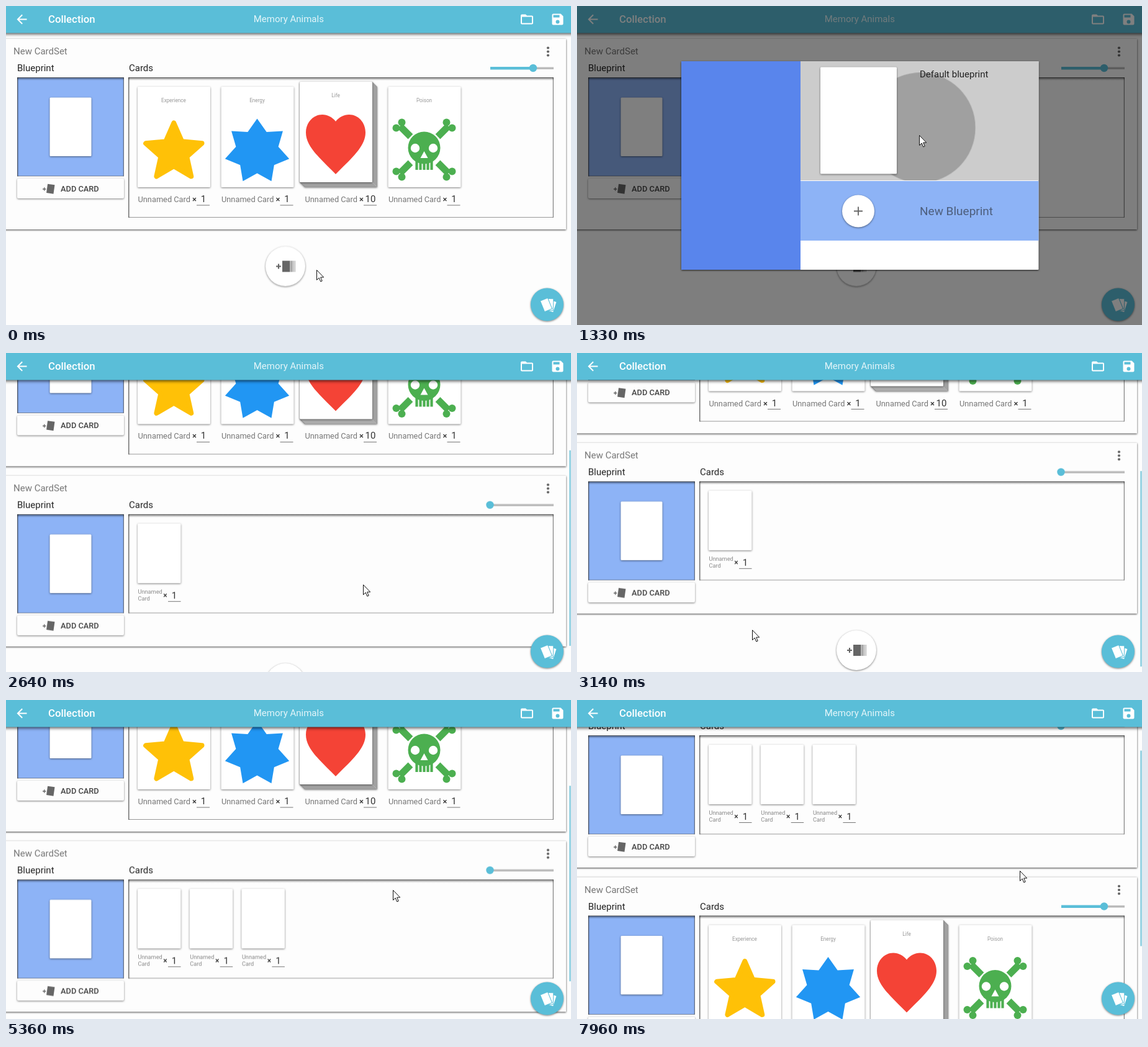
Write an HTML page that moves like this. It is 910 px wide and 514 px high and loops after 8 s.

```html
<!DOCTYPE html>
<html lang="en">
<head>
<meta charset="utf-8">
<title>Card collection</title>
<style>
@property --scroll { syntax: "<number>"; inherits: true; initial-value: 0; }
html, body { margin: 0; height: 100%; overflow: hidden; background: #fdfdfd; }
svg { display: block; width: 100vw; height: 100vh; font-family: Roboto, sans-serif; animation: scroll 8s ease-in-out infinite; }
.raised { filter: drop-shadow(0 1px 1.5px rgba(0,0,0,.5)); }
.sheet { filter: drop-shadow(0 1px 1.5px rgba(0,0,0,.75)); }
.bar { filter: drop-shadow(0 2px 2.5px rgba(0,0,0,.65)); }
.mid { text-anchor: middle; }
.bold { font-weight: 500; }

#content { transform: translateY(calc(var(--scroll) * -1px)); }
#thumb { transform: translateY(calc(var(--scroll) * .63px)); }
#setA, #setB, #plus, #thumbBox, #card1, #card2, #rowHover, #menuHover { animation: 8s step-end infinite; }
#setA { animation-name: setA; }
#setB { animation-name: setB; }
#plus { animation-name: plus; }
#thumbBox { animation-name: thumb; }
#card1 { animation-name: card1; }
#card2 { animation-name: card2; }
#rowHover { animation-name: rowHover; }
#menuHover { animation-name: menuHover; }
#shade { animation: shade 8s linear infinite; }
#dialog { transform-origin: 450px 420px; animation: dialog 8s ease-out infinite; }
#rowRipple { transform-origin: 553px 196px; animation: rowRipple 8s linear infinite; }
#menu { transform-origin: 888px 253px; animation: menu 8s ease-out infinite; }
#menuRipple { transform-origin: 856px 277px; animation: menuRipple 8s linear infinite; }
#cursor { animation: cursor 8s ease-in-out infinite; }

@keyframes scroll {
  0%, 27% { --scroll: 0; }
  36%, 61% { --scroll: 230.5; }
  66.5%, 68% { --scroll: 148; }
  72%, 98% { --scroll: 116; }
  99.5%, 100% { --scroll: 58; }
}
@keyframes setA {
  0% { transform: translateY(53px); }
  91%, 100% { transform: translateY(343.5px); }
}
@keyframes setB {
  0% { transform: translateY(375.3px); opacity: 0; }
  20.5% { transform: translateY(375.3px); opacity: 1; }
  91%, 100% { transform: translateY(53px); opacity: 1; }
}
@keyframes plus {
  0% { transform: translateY(419.5px); }
  20.5%, 100% { transform: translateY(709.5px); }
}
@keyframes thumb { 0% { opacity: 0; } 20.5%, 100% { opacity: 1; } }
@keyframes card1 { 0% { opacity: 0; } 47.6%, 100% { opacity: 1; } }
@keyframes card2 { 0% { opacity: 0; } 54.6%, 100% { opacity: 1; } }
@keyframes rowHover { 0% { opacity: 0; } 11.5%, 100% { opacity: 1; } }
@keyframes menuHover { 0% { opacity: 0; } 87.2%, 100% { opacity: 1; } }
@keyframes shade {
  0%, 3% { opacity: 0; }
  7%, 18% { opacity: .5; }
  21%, 100% { opacity: 0; }
}
@keyframes dialog {
  0%, 3.4% { opacity: 0; transform: scale(.1); }
  5% { opacity: 1; }
  7.5%, 18% { opacity: 1; transform: none; }
  20.5%, 100% { opacity: 0; transform: scale(.1); }
}
@keyframes rowRipple {
  0%, 15.2% { transform: scale(0); opacity: 1; }
  16.625% { transform: scale(1); opacity: 1; }
  18%, 100% { transform: scale(1.9); opacity: 0; }
}
@keyframes menu {
  0%, 73.2% { opacity: 0; transform: scale(.3); }
  74.6%, 88.8% { opacity: 1; transform: none; }
  90.2%, 100% { opacity: 0; transform: none; }
}
@keyframes menuRipple {
  0%, 87.2% { transform: scale(0); opacity: 1; }
  87.35% { transform: scale(1); opacity: 1; }
  90%, 100% { transform: scale(12); opacity: 0; }
}
@keyframes cursor {
  0%, .375% { transform: translate(500px, 425px); }
  1%, 4% { transform: translate(471px, 427px); }
  12%, 18% { transform: translate(551px, 208px); }
  25%, 34% { transform: translate(575px, 373px); }
  39.25% { transform: translate(282px, 446px); }
  44.6%, 56% { transform: translate(124px, 378px); }
  64%, 69% { transform: translate(623px, 306px); }
  73%, 75.2% { transform: translate(868px, 273px); }
  77% { transform: translate(790px, 315px); animation-timing-function: linear; }
  78.7% { transform: translate(766px, 383px); }
  80.5% { transform: translate(820px, 345px); animation-timing-function: linear; }
  82.3%, 89% { transform: translate(865px, 277px); }
  97%, 100% { transform: translate(713px, 275px); }
}
</style>
</head>
<body>
<svg id="stage" viewBox="0 0 910 514"></svg>
<script>
const TEAL = '#5abed8', GREY = '#666';

const rect = (x, y, w, h, fill, more = '') =>
  `<rect x="${x}" y="${y}" width="${w}" height="${h}" fill="${fill}" ${more}/>`;
const disc = (x, y, r, fill, more = '') => `<circle cx="${x}" cy="${y}" r="${r}" fill="${fill}" ${more}/>`;
const path = (d, fill, more = '') => `<path d="${d}" fill="${fill}" ${more}/>`;
const line = (d, color, width, more = '') => path(d, 'none', `stroke="${color}" stroke-width="${width}" ${more}`);
const text = (x, y, s, size, fill, cls = '') =>
  `<text x="${x}" y="${y}" font-size="${size}" fill="${fill}" class="${cls}">${s}</text>`;
const at = (x, y, body, more = '') => `<g transform="translate(${x} ${y}) ${more}">${body}</g>`;
const group = (id, body) => `<g id="${id}">${body}</g>`;
const paper = (x, y, w, h) => rect(x, y, w, h, '#fff', 'rx="1.5" class="raised"');

// Sunken box with a shadow along its top and left edges
const well = (x, y, w, h, fill) =>
  rect(x + .5, y + .5, w - 1, h - 1, fill, 'stroke="#000" stroke-opacity=".4"') +
  rect(x, y, w, 5, 'url(#down)') + rect(x, y, 3, h, 'url(#right)') +
  rect(x + w - 2, y, 2, h, '#000', 'opacity=".12"');

function star(n, outer, inner) {
  const pts = Array.from({ length: 2 * n }, (_, i) => {
    const r = i % 2 ? inner : outer, a = Math.PI * i / n;
    return `${(r * Math.sin(a)).toFixed(2)} ${(-r * Math.cos(a)).toFixed(2)}`;
  });
  return `M${pts.join('L')}Z`;
}

function skull() {
  const green = '#4caf50';
  const bone = line('M-39 -38L-22 -21', green, 11) + disc(-45, -35, 6, green) + disc(-36, -44, 6, green);
  const bones = [[1, 1], [-1, 1], [1, -1], [-1, -1]]
    .map(([sx, sy]) => at(58, 101.5, bone, `scale(${sx} ${sy})`)).join('');
  const teeth = [46, 52, 58, 64, 70].map(x => `M${x} 114V134`).join('');
  return bones + disc(58, 98, 27.5, '#fff') + disc(58, 98.5, 26, green) + line(teeth, green, 4.2) +
    disc(43.5, 99, 7.2, '#fff') + disc(72.5, 99, 7.2, '#fff') + path('M58 104l-6 11h12z', '#fff');
}

const heart = at(.4, 37.3, path('M12 21.35l-1.45-1.32C5.4 15.36 2 12.28 2 8.5 2 5.42 4.42 3 7.5 3c1.74 0 3.41.81 4.5 2.09C13.09 3.81 14.76 3 16.5 3 19.58 3 22 5.42 22 8.5c0 3.78-3.4 6.86-8.55 11.54z', '#f44336'), 'scale(4.8 5.23)');
const gold = at(58.3, 106, path(star(5, 47.5, 22), '#ffc107', 'stroke="#ffc107" stroke-width="8" stroke-linejoin="round"'));
const blue = at(58, 104.5, path(star(7, 53, 35), '#2196f3'));

function bigCard(i, name, art, count = 1) {
  const face = paper(0, 0, 117, 162) + text(58, 25, name, 8.2, '#999', 'mid') + art;
  let pile = '';
  if (count > 1) for (let k = 8; k > 0; k--)
    pile += rect(k - 8, k - 8, 116.5, 161.5, '#ddd', 'stroke="#888" stroke-width=".7"');
  return at(212 + i * 134.5, 77,
    (pile ? `<g class="raised">${pile}</g>` + at(-8, -8, face) : face) +
    text(.5, 186, 'Unnamed Card', 12.8, '#777') + text(91.5, 186, '×', 13, '#333', 'mid bold') +
    text(106, 186, count, 15, '#333', 'mid') + rect(95, 190.5, 21, 1, '#777'));
}

function smallCard(i) {
  return group('card' + i, at(212 + i * 83.7, 77,
    paper(0, 0, 69.5, 96) + text(.5, 112.5, 'Unnamed', 9.2, '#888') + text(.5, 123.5, 'Card', 9.2, '#888') +
    text(44.5, 119.5, '×', 12, '#333', 'mid bold') + text(59, 120.5, 1, 15, '#333', 'mid') +
    rect(49, 125, 20.5, 1, '#777')));
}

function cardSet(height, panel, knob, cards) {
  return rect(-4, 0, 906, height, '#fdfdfd', 'class="sheet"') +
    text(12, 25, 'New CardSet', 15, '#777') +
    [14.5, 20.5, 26.5].map(y => disc(873, y, 2.1, GREY)).join('') +
    text(18, 52, 'Blueprint', 15, '#222') + text(198, 52, 'Cards', 15, '#222') +
    rect(780, 45.5, 102, 3.5, '#bbb') + rect(780, 45, knob - 780, 4.5, TEAL) + disc(knob, 47, 6.2, TEAL) +
    well(18, 62, 172, 159.5, '#8db3f6') + paper(70.5, 94.5, 67, 94.5) +
    rect(18, 225, 172, 32, '#fdfdfd', 'rx="2" class="raised"') +
    line('M59 242h5.4M61.7 239.3v5.4', GREY, 1.3) +
    rect(66, 234.5, 11.5, 14.5, GREY, 'transform="rotate(8 72 242)"') +
    text(88, 245.5, 'ADD CARD', 12.8, '#444', 'bold') +
    well(197, 62, 685, panel, '#fdfdfd') + cards;
}

// Fan of three cards, centred on the origin
const fan = (fill, gap) =>
  rect(3, -8, 9, 17, fill, 'transform="rotate(18)"') +
  rect(-2, -9.5, 11, 19, fill, `transform="rotate(2)" stroke="${gap}"`) +
  rect(-9, -10, 13, 19, fill, `transform="rotate(-22)" stroke="${gap}"`);

const plusButton = disc(450, 0, 32, '#fff', 'class="raised"') +
  line('M435 0h8M439 -4v8', GREY, 2.2) + rect(445, -9, 12.5, 18, GREY) +
  rect(458.5, -9, 2, 18, '#888') + rect(461.5, -9, 1.6, 18, '#999') + rect(464.5, -9, 1.4, 18, '#aaa');

const header = rect(-8, -8, 926, 51.5, TEAL, 'class="bar"') +
  at(13.5, 9.5, path('M20 11H7.83l5.59-5.59L12 4l-8 8 8 8 1.41-1.41L7.83 13H20z', '#fff')) +
  text(68, 27, 'Collection', 16.8, '#fff', 'bold') +
  text(455.3, 26, 'Memory Animals', 15, '#e4f5f9', 'mid') +
  at(827, 9.5, path('M20 6h-8l-2-2H4c-1.1 0-2 .9-2 2v12c0 1.1.9 2 2 2h16c1.1 0 2-.9 2-2V8c0-1.1-.9-2-2-2zm0 12H4V8h16z', '#fff')) +
  at(876.5, 9.5, path('M17 3H5c-1.1 0-2 .9-2 2v14c0 1.1.9 2 2 2h14c1.1 0 2-.9 2-2V7zm-5 16a3 3 0 110-6 3 3 0 010 6zM15 9H5V5h10z', '#fff'));

const dialog = rect(168, 89, 575.5, 336, '#fff', 'rx="1" class="sheet"') +
  rect(168, 89, 192, 336, '#5985ec') +
  group('rowHover', rect(360, 89, 383.5, 192, '#ccc')) +
  `<g clip-path="url(#row)">${disc(553, 196, 88, '#9f9f9f', 'id="rowRipple"')}</g>` +
  paper(392, 98.5, 123, 172) + text(552, 115, 'Default blueprint', 15, '#222') +
  rect(360, 282, 383.5, 96, '#8db3f6') + disc(453, 330.5, 26, '#fff', 'class="raised"') +
  line('M446 330.5h14M453 323.5v14', GREY, 1.8) + text(552, 337, 'New Blueprint', 19, '#4d5e7c');

const up = line('M0 7.5V-6M-7 0L0 -7L7 0', GREY, 2);
const trash = path('M-6 -5H6V7a2 2 0 01-2 2H-4a2 2 0 01-2-2zM-7 -9h4l1-1h4l1 1h4v2.5H-7z', GREY);
const items = [
  ['Move Up', up], ['Move Down', at(0, 0, up, 'rotate(180)')],
  ['Export Set', at(0, 0, fan(GREY, '#fff'), 'scale(.72)')], ['Delete Set', trash]
];
const menu = rect(749, 253, 139, 169, '#fff', 'rx="1.5" class="sheet"') +
  group('menuHover', rect(749, 261, 139, 38, '#ccc')) +
  `<g clip-path="url(#item)">${disc(856, 277, 9.5, '#949494', 'id="menuRipple"')}</g>` +
  items.map(([label, icon], i) =>
    text(764, 284 + i * 38.3, label, 12.9, '#222') + at(860.5, 280 + i * 38.3, icon)).join('');

const bigCards = bigCard(0, 'Experience', gold) + bigCard(1, 'Energy', blue) +
  bigCard(2, 'Life', heart, 10) + bigCard(3, 'Poison', skull());

document.getElementById('stage').innerHTML = `<defs>
  <linearGradient id="down" x2="0" y2="1"><stop stop-opacity=".5"/><stop offset="1" stop-opacity="0"/></linearGradient>
  <linearGradient id="right"><stop stop-opacity=".4"/><stop offset="1" stop-opacity="0"/></linearGradient>
  <clipPath id="row"><rect x="360" y="89" width="383.5" height="192"/></clipPath>
  <clipPath id="item"><rect x="749" y="261" width="139" height="38"/></clipPath></defs>` +
  rect(0, 0, 910, 514, '#fdfdfd') +
  group('content',
    group('setA', cardSet(307, 226, 849, bigCards)) +
    group('setB', cardSet(275, 159.5, 779.5, [0, 1, 2].map(smallCard).join(''))) +
    group('plus', plusButton)) +
  group('thumbBox', rect(907, 45, 3, 315, '#9ad5e4', 'id="thumb"')) +
  header +
  disc(871.5, 481, 26.5, TEAL, 'class="raised"') + at(872.5, 481, fan('#fff', TEAL)) +
  rect(0, 0, 910, 514, '#000', 'id="shade"') +
  group('dialog', dialog) + group('menu', menu) +
  group('cursor', path('M.5 .5v16l3.7-3.5 2.6 6 2.4-1-2.5-5.9h5z', '#fff', 'stroke="#111"'));
</script>
</body>
</html>
```
